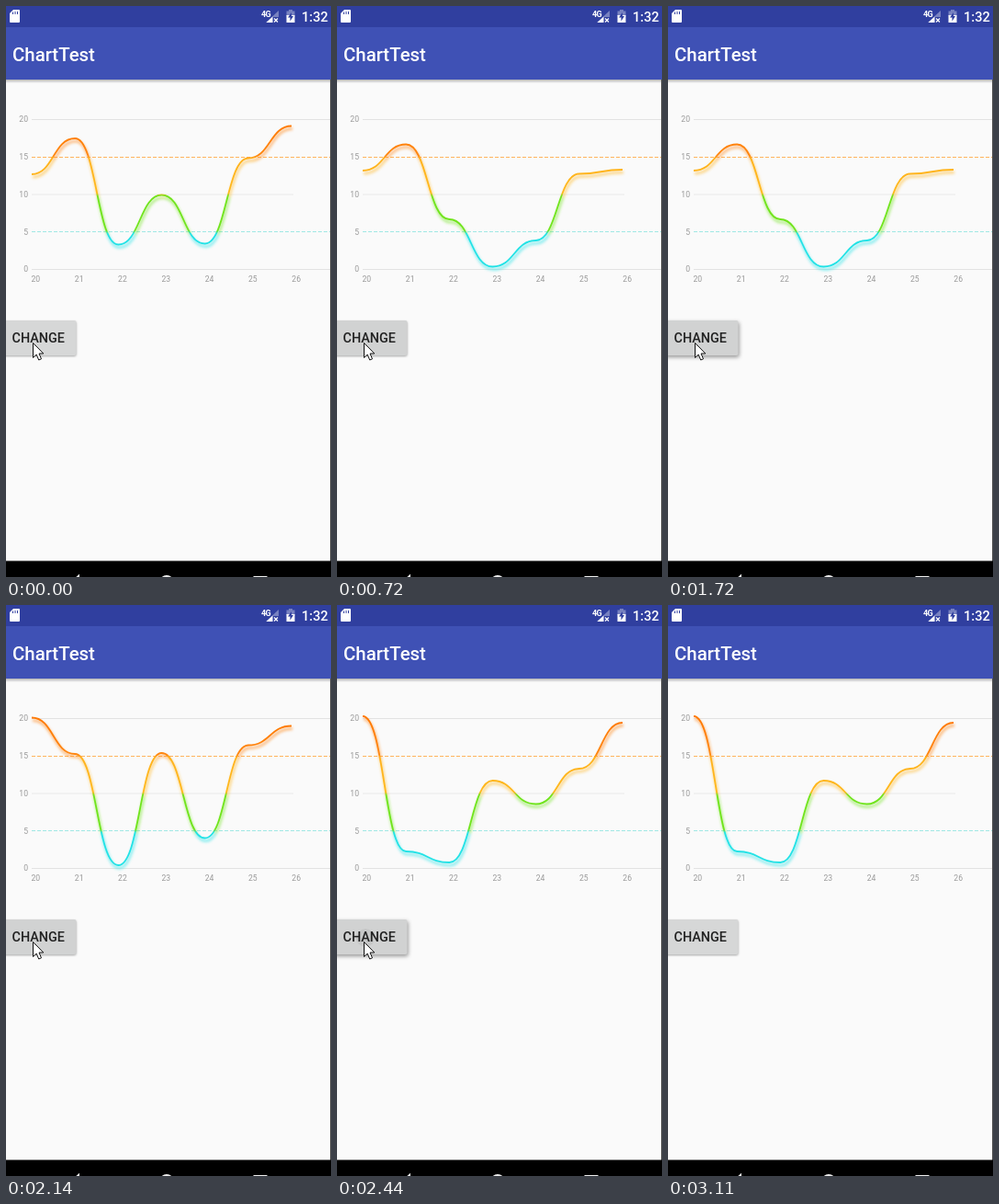
Recreate the animation shown at these times as an HTML page. Size 354 by 621 pixels, loop 3390 ms.

```html
<!DOCTYPE html>
<html lang="en">
<head>
<meta charset="utf-8">
<title>ChartTest</title>
<style>
  html, body { margin: 0; width: 100%; height: 100%; overflow: hidden; background: #fafafa; }
  svg { display: block; width: 354px; height: 621px; font-family: Roboto, sans-serif; }
  .medium { font-weight: 500; }
  .axis { font-size: 8.6px; fill: #999; }
  .flat { filter: drop-shadow(0 1px 1px #0005); }
  .raised { filter: drop-shadow(1px 2px 2px #0006); }
</style>
</head>
<body>
<svg viewBox="0 0 354 621">
  <defs>
    <linearGradient id="bands" gradientUnits="userSpaceOnUse" x1="0" y1="123.5" x2="0" y2="286.5">
      <stop offset="0" stop-color="#ff7800"/><stop offset=".24" stop-color="#ff8610"/>
      <stop offset=".26" stop-color="#ffb21c"/><stop offset=".49" stop-color="#ffb81c"/>
      <stop offset=".51" stop-color="#70e41c"/><stop offset=".74" stop-color="#70e41c"/>
      <stop offset=".76" stop-color="#22e2e6"/>
    </linearGradient>
    <linearGradient id="barShadow" x2="0" y2="1">
      <stop stop-color="#000" stop-opacity=".28"/><stop offset="1" stop-color="#000" stop-opacity="0"/>
    </linearGradient>
    <filter id="blur" filterUnits="userSpaceOnUse" x="0" y="100" width="354" height="210">
      <feGaussianBlur stdDeviation="1.7"/>
    </filter>
    <clipPath id="buttonClip"><rect x="-4" y="342" width="80.5" height="38" rx="2"/></clipPath>
  </defs>

  <rect width="354" height="621" fill="#fafafa"/>
  <rect y="80" width="354" height="4" fill="url(#barShadow)"/>
  <rect y="23" width="354" height="57" fill="#3f51b5"/>
  <rect width="354" height="23" fill="#303f9f"/>
  <rect x="353" y="80" width="1" height="524" fill="#555"/>

  <!-- status bar -->
  <g fill="#fff">
    <path d="M8 4H14Q15 4 15 5V17Q15 18 14 18H5Q4 18 4 17V8Z"/>
    <path d="M7.5 6.5V9M10 6V9M12.5 6V9" stroke="#303f9f"/>
    <text x="278" y="11.5" font-size="9" font-weight="700" letter-spacing="-.7">4G</text>
    <path d="M297 5V12H290V18H283Z" opacity=".35"/>
    <path d="M290.5 11.5V18H283.5Z"/>
    <path d="M292 13.5L296 17.5M296 13.5L292 17.5" stroke="#fff" stroke-width="1.2"/>
    <path d="M308 4H312V5.5H314.5V11H305.500V5.5H308Z" opacity=".35"/>
    <path d="M305.500 10H314.500V18H305.500Z"/>
    <path d="M311 7L307 12.500H309.500V16.500L313 11H311Z" fill="#303f9f"/>
    <text class="medium" x="322" y="17" font-size="14.6">1:32</text>
    <text class="medium" x="7" y="59.500" font-size="20.4">ChartTest</text>
  </g>

  <!-- chart -->
  <g fill="none">
    <path d="M28 123.500H353M28 286.500H353" stroke="#e2e2e2"/>
    <path d="M28 205H313" stroke="#e9e9e9"/>
    <path d="M28 164.500H353" stroke="#ffb45e" stroke-dasharray="4 2"/>
    <path d="M28 245.500H353" stroke="#a0e8e4" stroke-dasharray="4 2"/>
  </g>
  <g id="labels" class="axis"></g>
  <g fill="none" stroke="url(#bands)">
    <path class="curve" stroke-width="3" opacity=".5" transform="translate(1 3)" filter="url(#blur)"/>
    <path class="curve" stroke-width="1.8"/>
  </g>

  <!-- button -->
  <rect id="button" x="-4" y="342" width="80.500" height="38" rx="2"/>
  <circle id="ripple" cx="31" cy="362" fill="#000" opacity=".05" clip-path="url(#buttonClip)"/>
  <text class="medium" x="6.500" y="365.800" font-size="14.400" fill="#212121">CHANGE</text>

  <!-- navigation bar -->
  <rect y="603.500" width="354" height="18" fill="#000"/>
  <g fill="none" stroke="#eee" stroke-width="2">
    <path d="M71 627L79 620V634Z"/>
    <circle cx="175" cy="627" r="7"/>
    <rect x="270.500" y="621" width="13" height="13"/>
  </g>

  <path id="cursor" d="M0 0V16L3.700 12.600 6.200 18.500 9 17.300 6.500 11.500H11.300Z" fill="#fff" stroke="#111"/>
</svg>
<script>
const LOOP = 3390;
const LEFT = 28, STEP = 47.17;

// heights of the seven data points
const curves = [
  [183, 144, 259.5, 205.5, 258.5, 165.5, 130.5],
  [179, 150.5, 232, 283.5, 255, 182.5, 178],
  [122.5, 162, 283, 161, 253.5, 152.5, 131.5],
  [121, 268, 280, 191, 216.5, 178, 128]
];

// start time, curve, button colour, shadow, ripple radius
const states = [
  [0, 0, '#d6d7d7', 'flat', 0],
  [270, 1, '#d1d2d2', 'raised', 0],
  [420, 1, '#d1d2d2', 'flat', 0],
  [1720, 1, '#d1d2d2', 'raised', 0],
  [1840, 2, '#c9caca', 'flat', 32],
  [2140, 2, '#d1d2d2', 'flat', 0],
  [2440, 3, '#d1d2d2', 'raised', 10],
  [2570, 3, '#d6d7d7', 'flat', 0]
];

// start time, pointer tip
const pointer = [
  [0, 29.5, 366.5], [2710, 200.5, 500.5], [2860, 281.5, 568.5],
  [2985, 306.5, 604.5], [3110, -50, -50]
];

const $ = id => document.getElementById(id);
const at = (steps, t) => steps.findLast(step => step[0] <= t);

const label = (text, x, y, anchor) =>
  `<text x="${x}" y="${y}" text-anchor="${anchor}">${text}</text>`;
let labels = '';
for (let v = 0; v <= 20; v += 5) labels += label(v, 24, 289.3 - v * 8.15, 'end');
for (let i = 0; i < 7; i++) labels += label(20 + i, 27.5 + i * 47.3, 300, 'start');
$('labels').innerHTML = labels;

const smooth = ys => ys.map((y, i) => {
  const x = LEFT + i * STEP, mid = x - STEP / 2;
  return i ? `C${mid} ${ys[i - 1]} ${mid} ${y} ${x} ${y}` : `M${x} ${y}`;
}).join('');

const start = performance.now();
function draw() {
  const t = (performance.now() - start) % LOOP;
  const [, curve, fill, shadow, radius] = at(states, t);
  const [, x, y] = at(pointer, t);
  const d = smooth(curves[curve]);
  document.querySelectorAll('.curve').forEach(path => path.setAttribute('d', d));
  $('button').setAttribute('fill', fill);
  $('button').setAttribute('class', shadow);
  $('ripple').setAttribute('r', radius);
  $('cursor').setAttribute('transform', `translate(${x} ${y})`);
  requestAnimationFrame(draw);
}
draw();
</script>
</body>
</html>
```
